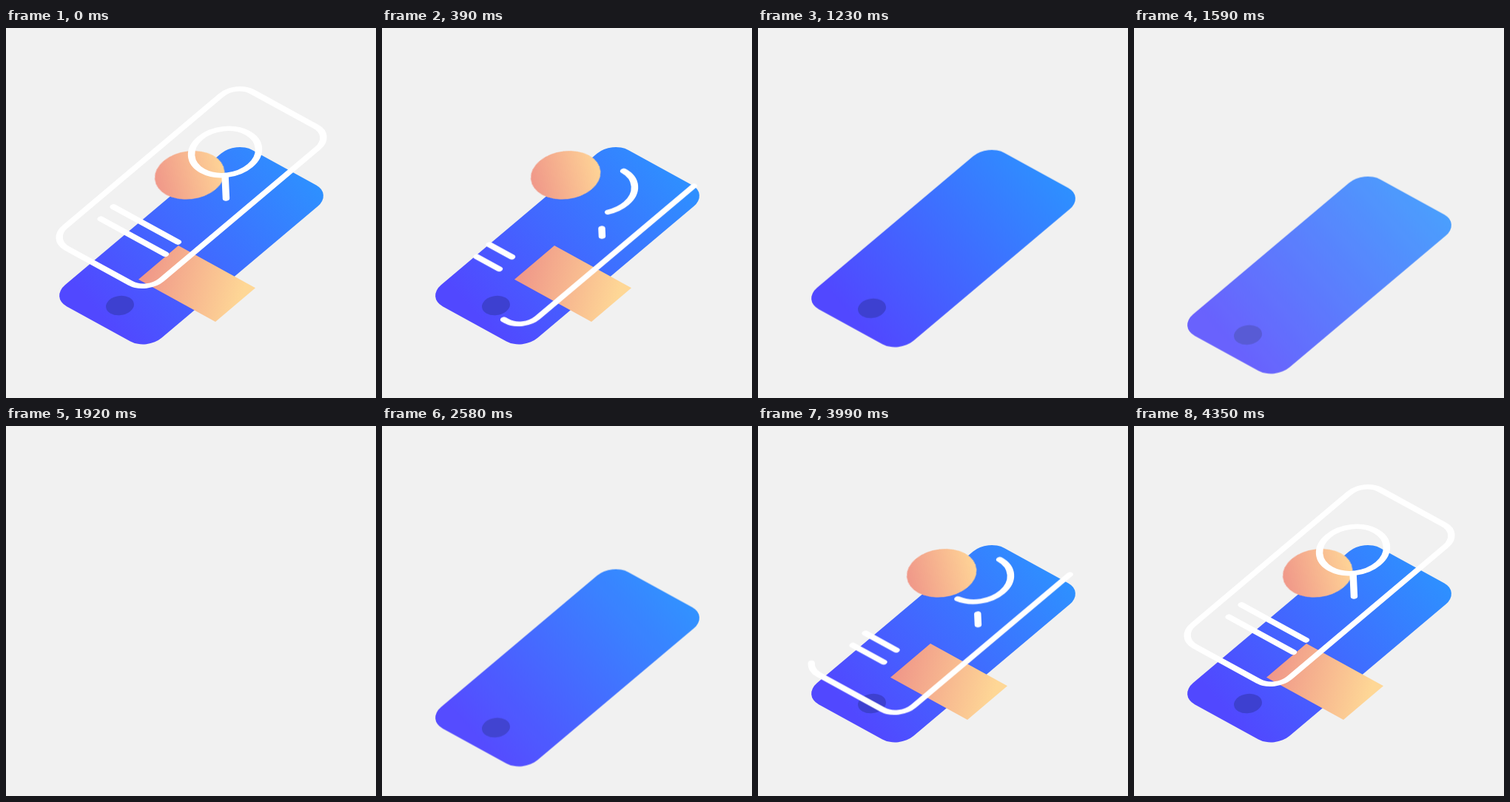
Write an HTML page that moves like this. It is 500 by 500 pixels and loops after 4560 ms.

```html
<!DOCTYPE html>
<html lang="en">
<head>
<meta charset="utf-8">
<title>Isometric phone</title>
<style>
  html, body { margin: 0; width: 100%; height: 100%; overflow: hidden; background: #f1f1f1; }
  svg { display: block; width: 100vw; height: 100vh; }

  /* this curve equals 3t² - 2t³ */
  .a { animation: 4560ms cubic-bezier(.3333, 0, .6667, 1) infinite; }

  .phone { animation-name: sink; }
  .phone > g { animation-name: phone-fade; }
  .disc { --x: -41.4px; --y: -23.5px; animation-name: part; }
  .tile { --x: 58.8px; --y: 33.4px; animation-name: part; }
  .parts { animation-name: part-fade; }
  .wire { animation-name: lift; }
  .wire > g { animation-name: show; animation-timing-function: step-end; }
  .wire .a.draw { animation-name: draw; }
  .draw {
    fill: none; stroke: #fff; stroke-width: 7;
    stroke-linecap: round; stroke-linejoin: round; stroke-dasharray: 1 2;
  }

  @keyframes sink {
    0%, 24.561% { transform: translateY(0); }
    39.035%, 51.425% { transform: translateY(49.5px); }
    64.583%, 100% { transform: translateY(0); }
  }
  @keyframes phone-fade {
    0%, 32.456% { opacity: 1; }
    42.325%, 47.588% { opacity: 0; }
    57.456%, 100% { opacity: 1; }
  }
  @keyframes part {
    0%, 14.32% { transform: translate(0, 0); }
    24.846%, 65.439% { transform: translate(var(--x), var(--y)); }
    78.596%, 100% { transform: translate(0, 0); }
  }
  @keyframes part-fade {
    0%, 17.105% { opacity: 1; }
    23.684%, 65.789% { opacity: 0; }
    74.342%, 100% { opacity: 1; }
  }
  @keyframes lift {
    0% { transform: translateY(0); }
    14.254%, 79.715% { transform: translateY(78.7px); }
    95.066%, 100% { transform: translateY(0); }
  }
  @keyframes draw {
    0% { stroke-dashoffset: 0; }
    14.254%, 80.044% { stroke-dashoffset: 1; }
    95.395%, 100% { stroke-dashoffset: 0; }
  }
  @keyframes show {
    0% { opacity: 1; }
    14.254% { opacity: 0; }
    80.06%, 100% { opacity: 1; }
  }
</style>
</head>
<body>
<svg viewBox="0 0 500 500">
  <defs>
    <linearGradient id="blue" gradientUnits="userSpaceOnUse" x1="-39" y1="118.5" x2="52.6" y2="-159.7">
      <stop offset="0" stop-color="#5148ff"/><stop offset="1" stop-color="#2b96ff"/>
    </linearGradient>
    <linearGradient id="peach" gradientUnits="userSpaceOnUse" x1="-21" y1="27" x2="21" y2="-27">
      <stop offset="0" stop-color="#f09889"/><stop offset="1" stop-color="#fed396"/>
    </linearGradient>
    <linearGradient id="sand" gradientUnits="userSpaceOnUse" x1="190" y1="325" x2="320" y2="360">
      <stop offset="0" stop-color="#f09889"/><stop offset="1" stop-color="#fed796"/>
    </linearGradient>
    <!-- starts at the top of the right side, runs clockwise -->
    <path id="body" pathLength="1" d="M65.25-117.2V117.2a22.2 22.2 0 0 1-22.2 22.2H-43.05a22.2 22.2 0 0 1-22.2-22.2V-117.2a22.2 22.2 0 0 1 22.2-22.2H43.05a22.2 22.2 0 0 1 22.2 22.2Z"/>
  </defs>

  <g class="a phone">
    <g class="a">
      <use href="#body" fill="url(#blue)" transform="matrix(1 .548 -.9 .758 250.5 294.2)"/>
      <circle r="14.1" fill="#3d40d0" transform="matrix(1 .548 -.9 .758 154 375)"/>
    </g>
  </g>

  <g class="a parts">
    <g class="a tile">
      <path d="M233 294 337 351.3 283 397 179 339.7Z" fill="url(#sand)"/>
    </g>
    <g class="a disc">
      <circle r="35.1" fill="url(#peach)" transform="matrix(1 .548 -.9 .758 248.2 198.8)"/>
    </g>
  </g>

  <g class="a wire">
    <g class="a">
      <g transform="matrix(1 .548 -.9 .758 250.5 215.5)">
        <use href="#body" class="a draw"/>
      </g>
      <g transform="matrix(1 .548 -.9 .758 296 167.5)">
        <path class="a draw" pathLength="1" d="M0-33.8A33.8 33.8 0 0 1 0 33.8A33.8 33.8 0 0 1 0-33.8Z"/>
        <path class="a draw" pathLength="1" d="M46.2 49.7 22.7 25.2"/>
      </g>
      <g transform="matrix(1 .548 -.9 .758 145 241.5)">
        <path class="a draw" pathLength="1" d="M0 0H87.5"/>
      </g>
      <g transform="matrix(1 .548 -.9 .758 128 257.8)">
        <path class="a draw" pathLength="1" d="M0 0H87.5"/>
      </g>
    </g>
  </g>
</svg>
</body>
</html>
```
